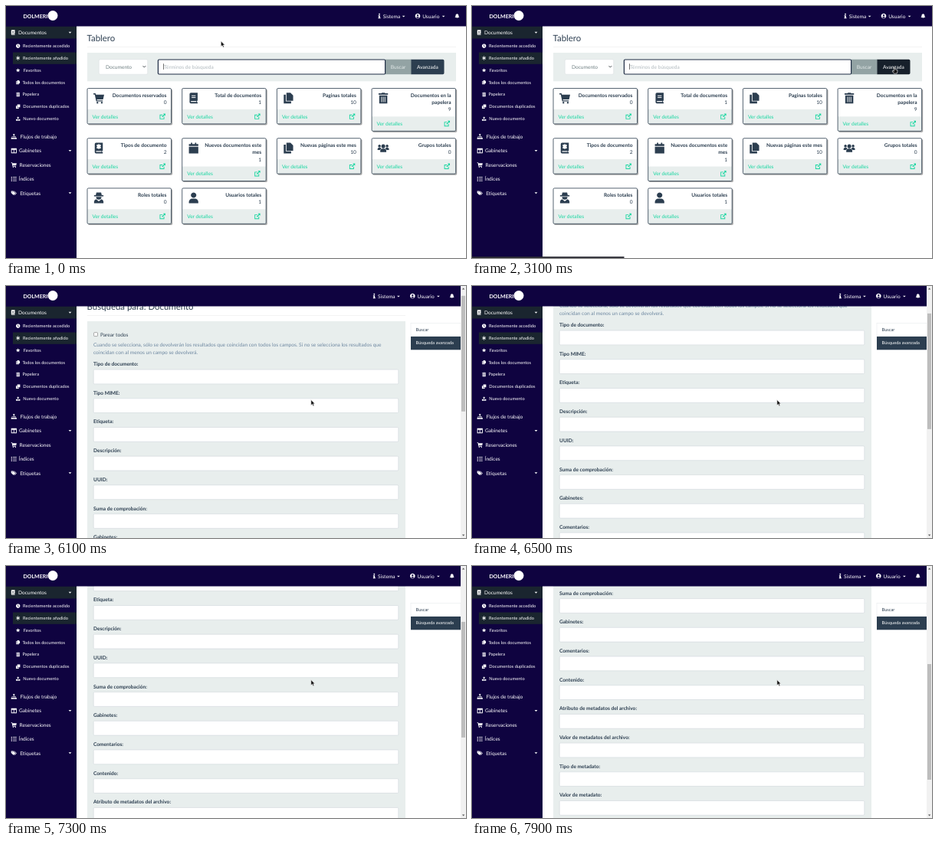
An HTML page for the animation above (8 s loop, 600 by 329 pixels).

```html
<!DOCTYPE html>
<html lang="es">
<head>
<meta charset="utf-8">
<title>Tablero</title>
<style>
  html, body { margin: 0; width: 100%; height: 100%; overflow: hidden; background: #fff; }
  svg { display: block; width: 600px; height: 329px; }
  text { font-family: Lato, sans-serif; text-rendering: geometricPrecision; white-space: pre; }
</style>
</head>
<body>
<svg id="stage" viewBox="0 0 600 329" xmlns="http://www.w3.org/2000/svg"></svg>
<script>
const LOOP = 8000, STEP = 100;
const NAVY = '#0f0340', DARK = '#1a252f', SLATE = '#2c3e50', PANEL = '#e8eeed', TEAL = '#18d6a0';
const BODY = 6.59, SMALL = 5.71, TITLE = 11.42;

// Icons live in a 16 x 16 box.
const BOOK = 'M4 0H14V12H13V14H14V16H4A2 2 0 0 1 2 14V2A2 2 0 0 1 4 0ZM4 12.3V13.9H12V12.3Z';
const ICONS = {
  book: BOOK + 'M5 4H11V5.3H5ZM5 6.5H11V7.8H5Z',
  type: BOOK + 'M7.2 2H8.8V3.2L10.4 2.7 11.4 4.2 10.4 5.8 11.4 7.4 10.4 8.9 8.8 8.4V9.6H7.2V8.4L5.6 8.9 4.6 7.4 5.6 5.8 4.6 4.2 5.6 2.7 7.2 3.2Z',
  clock: 'M8 0a8 8 0 1 0 .01 0zM7 3h2v5l3 2-1 1.6L7 9z',
  asterisk: 'M6.8 0h2.4v5.8l5-2.9 1.2 2.1-5 2.9 5 2.9-1.2 2.1-5-2.9V16H6.8v-5.9l-5 2.9L.6 10.9l5-2.9-5-2.9L1.8 3l5 2.9z',
  star: 'M8 0l2.3 5.2 5.7.6-4.3 3.8 1.3 5.6L8 12.3l-5 2.9 1.3-5.6L0 5.8l5.7-.6z',
  copy: 'M5 0h6l4 4v8H5zM1 3h3v10h8v3H1z',
  trash: 'M1 1h4l1-1h4l1 1h4v2H1zM2 4h12v12H2zM5 6v8h1V6zM7.5 6v8h1V6zM10 6v8h1V6z',
  clone: 'M5 0h11v11H5zM0 5h4v7h7v4H0z',
  upload: 'M8 0l5 5H9.5v6h-3V5H3zM0 10h5v2.5h6V10h5v6H0z',
  flow: 'M6 0h4v4H8.7v3H14v4h2v4h-5v-4h1.6V8.4H8.7V11h1.8v4h-5v-4h1.8V8.4H3.4V11H5v4H0v-4h2V7h5.3V4H6z',
  columns: 'M0 1h16v14H0zM2 5v8h5V5zM9 5v8h5V5z',
  cart: 'M0 1h3.2l.5 2H16l-1.6 7H5.2l.3 1.5H14V13H4.2L2 2.6H0zM6 13.5a1.4 1.4 0 1 0 .01 0zM12.5 13.5a1.4 1.4 0 1 0 .01 0z',
  list: 'M0 1.5h3v3H0zM5 2.2h11v1.7H5zM0 6.5h3v3H0zM5 7.2h11v1.7H5zM0 11.5h3v3H0zM5 12.2h11v1.7H5z',
  tags: 'M0 2h6l6.5 6.5L7 14 0 7.5zM2.5 4v2h2V4zM8 2h1.5L16 8.5 10.5 14l-1-1 4.4-4.5z',
  info: 'M4.5 6H10v7h1.5v3h-7v-3H6V9H4.5zM8 0a2.2 2.2 0 1 0 .01 0z',
  account: 'M8 0a8 8 0 1 0 .01 0zM8 3a3 3 0 1 0 .01 0zM3 12.5c2-3 8-3 10 0-2 3-8 3-10 0z',
  bell: 'M8 0c1 0 1 1 1 1.3 3 .5 4 3 4 5.2 0 3.5 1 4.5 2 5.5v1H1v-1c1-1 2-2 2-5.5C3 4.300 4 1.800 7 1.300 7 1 7 0 8 0zM6 14h4a2 2 0 0 1-4 0z',
  calendar: 'M1 2h3V0h2v2h4V0h2v2h3v3H1zM1 6h14v10H1z',
  user: 'M8 0a4 4 0 1 0 .01 0zM1 16v-2a5 5 0 0 1 5-5h4a5 5 0 0 1 5 5v2z',
  users: 'M8 2.500a2.900 2.900 0 1 0 .01 0zM3.500 14v-1.500a3.500 3.500 0 0 1 3.500-3.500h2a3.500 3.500 0 0 1 3.500 3.500V14zM2.300 3a2 2 0 1 0 .01 0zM13.700 3a2 2 0 1 0 .01 0zM-.5 11V9.500A2 2 0 0 1 1.500 7.500H4L5 8.600 3 11zM16.500 11V9.500A2 2 0 0 0 14.500 7.500H12L11 8.600 13 11z',
  spy: 'M4.500 0h7l1 4H15v1.500H1V4h2.500zM4 6.500h8a4 4 0 0 1-8 0zM1 16v-2a4 4 0 0 1 3-4l4 3 4-3a4 4 0 0 1 3 4v2z',
  open: 'M0 3h8v2H2v9h9V9h2v7H0zM9.500 0H16v6.500L13.800 4.300 7.500 10.600 5.700 8.800 12 2.500z',
  caret: 'M2 5h12l-6 6z'
};

const attrs = o => Object.entries(o).map(([k, v]) => ` ${k}="${v}"`).join('');
const rect = (x, y, w, h, fill, more = {}) =>
  `<rect${attrs({ x, y, width: w, height: h, fill, ...more })}/>`;
const path = (d, more) => `<path${attrs({ d, ...more })}/>`;
const group = (id, inner) => `<g id="${id}">${inner}</g>`;
// Text centred vertically on cy.
const label = (x, cy, str, fill, size = BODY, more = {}) =>
  `<text${attrs({ x, y: cy + size * 0.35, fill, 'font-size': size, ...more })}>${str}</text>`;
const icon = (name, cx, cy, size, fill) => path(ICONS[name], {
  fill, 'fill-rule': 'evenodd',
  transform: `translate(${cx - size / 2} ${cy - size / 2}) scale(${size / 16})`
});
const BOLD = { 'font-weight': 700 };

function sidebar() {
  const sub = [
    ['clock', 22, 'Recientemente accedido'], ['asterisk', 22, 'Recientemente añadido'],
    ['star', 22.8, 'Favoritos'], ['copy', 21.4, 'Todos los documentos'],
    ['trash', 21.4, 'Papelera'], ['clone', 22.2, 'Documentos duplicados'],
    ['upload', 22.2, 'Nuevo documento']
  ];
  const main = [
    ['flow', 18.5, 'Flujos de trabajo'], ['columns', 17, 'Gabinetes', true],
    ['cart', 17.6, 'Reservaciones'], ['list', 16.6, 'Índices'], ['tags', 18.2, 'Etiquetas', true]
  ];
  let s = rect(0, 0, 92, 329, NAVY) + rect(0, 26.5, 92, 16, DARK) + rect(9, 60.5, 83, 15.3, DARK);
  s += icon('book', 9.2, 34.5, 6.4, '#fff') + label(16, 34.5, 'Documentos', '#fff') + icon('caret', 83.5, 34.7, 5, '#fff');
  sub.forEach(([name, x, str], i) => {
    const cy = 52.2 + i * 15.82;
    s += icon(name, 15.7, cy, 5.4, '#fff') + label(x, cy, str, '#fff', SMALL);
  });
  main.forEach(([name, x, str, more], i) => {
    const cy = 170.6 + i * 18.4;
    s += icon(name, 10.3, cy, 7.2, '#fff') + label(x, cy, str, '#fff');
    if (more) s += icon('caret', 83.5, cy, 5, '#fff');
  });
  return s;
}

function header() {
  return rect(0, 0, 600, 26.5, NAVY) +
    label(22.5, 14, 'DOLMERI', '#fff', 7, BOLD) +
    '<circle cx="61" cy="12.5" r="6.5" fill="#fff"/>' +
    group('menu',
      icon('info', 487, 13, 6.6, '#fff') + label(491.8, 13.2, 'Sistema', '#fff') + icon('caret', 518.6, 13.6, 5, '#fff') +
      icon('account', 537, 13, 6.6, '#fff') + label(543.2, 13.2, 'Usuario', '#fff') + icon('caret', 570.6, 13.6, 5, '#fff') +
      icon('bell', 588.4, 13, 6.2, '#fff'));
}

function card(col, row, name, lines, count) {
  const x = 106 + col * 123.7, y = 107.5 + row * 65.2, w = 109.5;
  const h = 37 + lines.length * 9.4, foot = y + h - 19;
  const right = { 'text-anchor': 'end' };
  let s = rect(x + 1, y + 1.2, w + 0.6, h + 0.4, '#000', { rx: 1.7, opacity: 0.35 }) +
    rect(x, y, w, h, '#fff', { rx: 1.5 }) + rect(x, foot, w, 19, PANEL) +
    rect(x, y, w, h, 'none', { rx: 1.5, stroke: SLATE, 'stroke-width': 0.8 }) +
    icon(name, x + 15, y + 12.7, 14, SLATE);
  lines.forEach((str, i) => s += label(x + 103.5, y + 8.7 + i * 9.4, str, SLATE, BODY, { ...BOLD, ...right }));
  return s + label(x + 103.5, y + 8.7 + lines.length * 9.4, count, SLATE, BODY, right) +
    label(x + 6.5, foot + 9.5, 'Ver detalles', TEAL) + icon('open', x + 98.2, foot + 9.2, 7.4, TEAL);
}

function dashboard() {
  const cards = [
    ['cart', ['Documentos reservados'], 0], ['book', ['Total de documentos'], 1],
    ['copy', ['Paginas totales'], 10], ['trash', ['Documentos en la', 'papelera'], 9],
    ['type', ['Tipos de documento'], 2], ['calendar', ['Nuevos documentos este', 'mes'], 1],
    ['copy', ['Nuevas páginas este mes'], 10], ['users', ['Grupos totales'], 0],
    ['spy', ['Roles totales'], 0], ['user', ['Usuarios totales'], 1]
  ];
  return label(105.6, 41.7, 'Tablero', SLATE, TITLE) + rect(106, 53, 481, 0.5, '#e6e6e6') +
    rect(106, 61, 481, 37.3, PANEL) +
    rect(121.200, 69.700, 63.500, 19.500, '#fff', { rx: 1.7, stroke: '#d5dadd', 'stroke-width': 0.5 }) +
    label(130, 79.2, 'Documento', '#6f7f82') +
    path('M178.600 78.200l1.800 1.900 1.800-1.900', { fill: 'none', stroke: '#343a40', 'stroke-width': 0.9 }) +
    rect(494.500, 69.700, 34.500, 19.500, '#93a3a4') +
    label(501.800, 79.2, 'Buscar', '#e3e9e9') +
    `<path id="advanced" d="M528.500 69.700h41.300a1.700 1.700 0 0 1 1.700 1.700v16.100a1.700 1.700 0 0 1-1.700 1.700h-41.300z"/>` +
    label(536, 79.2, 'Avanzada', '#fff') +
    rect(198.400, 70, 296.200, 19, '#fff', { rx: 1.2, stroke: '#1f2d45', 'stroke-width': 1.2 }) +
    label(206, 79.2, 'Términos de búsqueda', '#b0b9be') +
    rect(205.200, 75.3, 0.6, 7.6, '#111', { id: 'blink' }) +
    cards.map(([name, lines, n], i) => card(i % 4, Math.floor(i / 4), name, lines, n)).join('');
}

function searchForm() {
  const fields = ['Tipo de documento', 'Tipo MIME', 'Etiqueta', 'Descripción', 'UUID',
    'Suma de comprobación', 'Gabinetes', 'Comentarios', 'Contenido',
    'Atributo de metadatos del archivo', 'Valor de metadatos del archivo',
    'Tipo de metadato', 'Valor de metadato'];
  const hint = '#6d87a0';
  let s = label(105.6, 41.7, 'Búsqueda para: Documento', SLATE, TITLE) + rect(106, 53, 415, 0.5, '#e6e6e6') +
    rect(106, 61, 415, 620, PANEL) +
    rect(114.600, 75.700, 4.900, 4.900, '#fff', { rx: 0.8, stroke: '#767676', 'stroke-width': 0.6 }) +
    label(123, 78.2, 'Parear todos', SLATE) +
    label(114, 91.6, 'Cuando se selecciona, sólo se devolverán los resultados que coincidan con todos los campos. Si no se selecciona los resultados que', hint) +
    label(114, 101.2, 'coincidan con al menos un campo se devolverá.', hint);
  fields.forEach((str, i) => {
    const cy = 116.7 + i * 37.7;
    s += label(114, cy, str + ':', SLATE, BODY, BOLD) +
      rect(114.200, cy + 7.4, 397.600, 18.8, '#fff', { rx: 1.3, stroke: '#cfd6da', 'stroke-width': 0.6 });
  });
  return s;
}

const sideLinks = () =>
  rect(528, 48.3, 65, 17.3, '#fff', { stroke: '#e4e7e9', 'stroke-width': 0.5 }) +
  label(534.5, 56.8, 'Buscar', SLATE, SMALL) +
  rect(528, 66, 65, 17.3, SLATE) + label(534.5, 74.4, 'Búsqueda avanzada', '#fff', SMALL);

const scrollbar = () =>
  rect(593, 0, 7, 329, '#f1f1f1') +
  path('M594.900 4.500h3.400l-1.700-2zM594.900 324.500h3.400l-1.700 2z', { fill: '#555' }) +
  rect(594, 6, 5, 151, '#bdbdbd', { id: 'thumb' });

const pointer = { stroke: '#fff', 'stroke-width': 0.6, 'stroke-linejoin': 'round', fill: '#111' };

document.getElementById('stage').innerHTML =
  rect(0, 0, 600, 329, '#fff') +
  group('home', dashboard()) +
  group('search', group('form', searchForm()) + sideLinks()) +
  sidebar() + header() + group('bar', scrollbar()) +
  rect(0, 327.2, 198, 1.8, '#2b2b33', { id: 'status' }) +
  group('cursor',
    path('M0 0v7.200l1.700-1.500 1.200 2.600 1.300-.6-1.200-2.500h2.200z', { id: 'arrow', ...pointer }) +
    path('M-.7.400Q0-.4.700.400V3.200L3.900 4V6.400L3.200 8.600H-.7L-2.900 5.500-2.200 4.700-.7 5.800z', { id: 'hand', ...pointer }));

const el = id => document.getElementById(id);
const show = (id, on) => el(id).setAttribute('visibility', on ? 'inherit' : 'hidden');
const move = (id, x, y) => el(id).setAttribute('transform', `translate(${x} ${y})`);

const cursorX = [[800, 280.3], [1300, 395], [1700, 490], [1800, 490], [2300, 551], [3300, 551], [3500, 549.8], [4700, 549.8], [5100, 470], [5500, 397.8]];
const cursorY = [[800, 45.8], [1300, 60], [1700, 72], [1800, 72], [2300, 79.5], [3300, 79.5], [3500, 78.8], [4700, 78.8], [5100, 118], [5500, 148.6]];
const scrollY = [[5900, 0], [6000, 4], [6100, 15], [6400, 57], [6500, 66], [6600, 70], [7000, 70], [7100, 90], [7300, 148], [7900, 270]];

function at(keys, t) {
  if (t <= keys[0][0]) return keys[0][1];
  for (let i = 1; i < keys.length; i++) {
    const [t0, a] = keys[i - 1], [t1, b] = keys[i];
    if (t <= t1) return a + (b - a) * (t - t0) / (t1 - t0);
  }
  return keys[keys.length - 1][1];
}

function draw(t) {
  const searching = t >= 4500, hover = t >= 2300 && t < 4900;
  const y = at(scrollY, t);
  show('home', !searching);
  show('search', searching);
  show('bar', searching);
  move('menu', searching ? -6.7 : 0, 0);
  move('form', 0, -y);
  move('thumb', 0, y * 0.452);
  move('cursor', at(cursorX, t), at(cursorY, t));
  show('hand', hover);
  show('arrow', !hover);
  show('blink', !searching && Math.floor((t + 455) / 555) % 2 === 0);
  el('advanced').setAttribute('fill', hover ? '#17202b' : SLATE);
  el('status').setAttribute('width', searching ? 183.500 : 198.500);
  el('status').setAttribute('opacity', at([[2400, 0], [2700, 1], [5000, 1], [5300, 0]], t));
}

function tick() {
  draw(Math.floor(performance.now() % LOOP / STEP) * STEP);
  requestAnimationFrame(tick);
}
tick();
</script>
</body>
</html>
```
